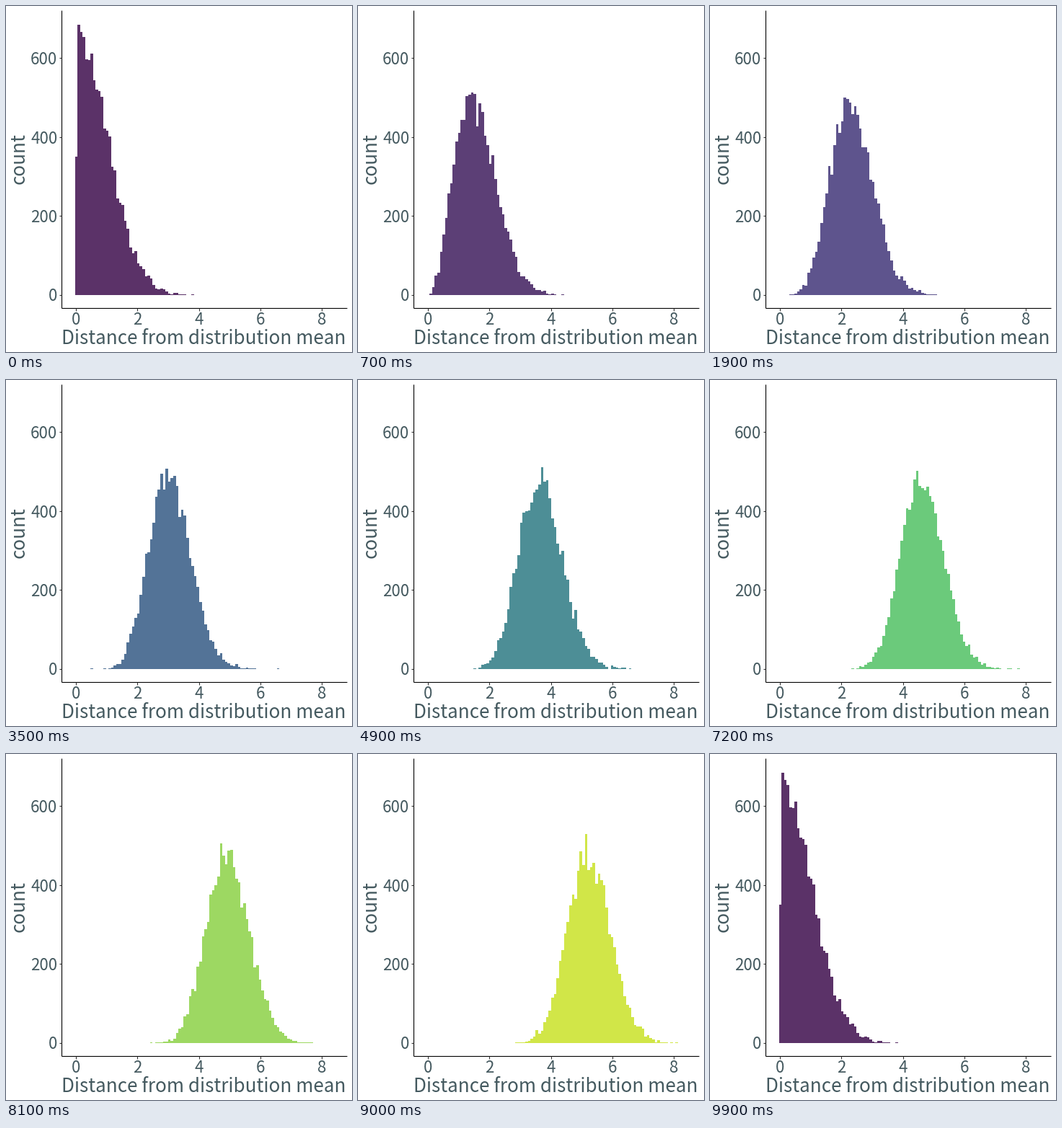
Recreate the animation shown at these times as a matplotlib script. Size 480 by 480 pixels, loop 10000 ms.

```python
import numpy as np
import matplotlib.pyplot as plt
from matplotlib.animation import FuncAnimation
from matplotlib.colors import LinearSegmentedColormap

SIZE, DPI = 480, 100
FRAMES, INTERVAL = 100, 100
SAMPLES, BINS, STATES = 10000, 100, 30
MAX_COUNT = 685

# Panel geometry in pixels.
LEFT, RIGHT, TOP, BOTTOM = 77.1, 473, 6.4, 419.2
BIN_PX = 3.591
EDGES = 95.55 + BIN_PX * np.arange(BINS + 1)
X0, X_UNIT = 97.2, 42.6
Y0, Y_UNIT = 400.8, 0.5472
BIN_W = BIN_PX / X_UNIT

FONT = "Noto Sans CJK JP"
TEXT = "#455a60"

# Key colours by dimension; the rest is interpolated.
KEY_COLORS = {1: "#5b3268", 6: "#5e548d", 10: "#537397", 14: "#4d8e96",
              18: "#4aac8f", 22: "#6aca7b", 28: "#d0e648", 30: "#fae84d"}
CMAP = LinearSegmentedColormap.from_list(
    "dims", [((k - 1) / (STATES - 1), c) for k, c in KEY_COLORS.items()])

# First frame of each dimension; the last entry returns to dimension 1.
STARTS = [0, *range(3, 44, 4), 46, 49, *range(51, FRAMES, 3)]


def bar_tops(k):
    """Histogram of the distances of k-dimensional normal samples from 0."""
    rng = np.random.default_rng(100 + k)
    dist = np.sqrt(rng.chisquare(k, SAMPLES))
    bins = np.minimum((dist / BIN_W + 0.5).astype(int), BINS - 1)
    counts = np.bincount(bins, minlength=BINS)
    return Y0 - Y_UNIT * np.minimum(counts, MAX_COUNT)


TOPS = [bar_tops(k) for k in range(1, STATES + 1)]

fig = plt.figure(figsize=(SIZE / DPI, SIZE / DPI), dpi=DPI, facecolor="white")
ax = fig.add_axes([0, 0, 1, 1])
ax.set(xlim=(0, SIZE), ylim=(SIZE, 0))
ax.axis("off")


def line(xs, ys, color="black", width=1.1):
    ax.plot(xs, ys, color=color, lw=width * 72 / DPI, solid_capstyle="butt")


def label(x, y, text, px, **kw):
    ax.text(x, y, text, fontsize=px * 72 / DPI, family=FONT, color=TEXT,
            va="baseline", rotation_mode="anchor", **kw)


line([LEFT, LEFT], [TOP, BOTTOM])
line([LEFT, RIGHT], [BOTTOM, BOTTOM])

for n in range(0, 9, 2):
    x = X0 + n * X_UNIT
    line([x, x], [BOTTOM, BOTTOM + 4], "#333333")
    label(x, 441.6, str(n), 22.3, ha="center")

for n in range(0, 601, 200):
    y = Y0 - n * Y_UNIT
    line([LEFT - 3.6, LEFT], [y, y], "#333333")
    label(71.3, y + 8.6, str(n), 22.3, ha="right")

label(274.6, 468.6, "Distance from distribution mean", 26.1, ha="center")
label(26, 212, "count", 26.1, ha="center", rotation=90)

bars = ax.stairs(TOPS[0], EDGES, baseline=Y0, fill=True, lw=0,
                 antialiased=False)


def update(frame):
    state = (int(np.searchsorted(STARTS, frame, "right")) - 1) % STATES
    bars.set_data(values=TOPS[state])
    bars.set_facecolor(CMAP(state / (STATES - 1)))
    return [bars]


anim = FuncAnimation(fig, update, frames=FRAMES, interval=INTERVAL,
                     repeat=True, repeat_delay=0)
plt.show()
```
